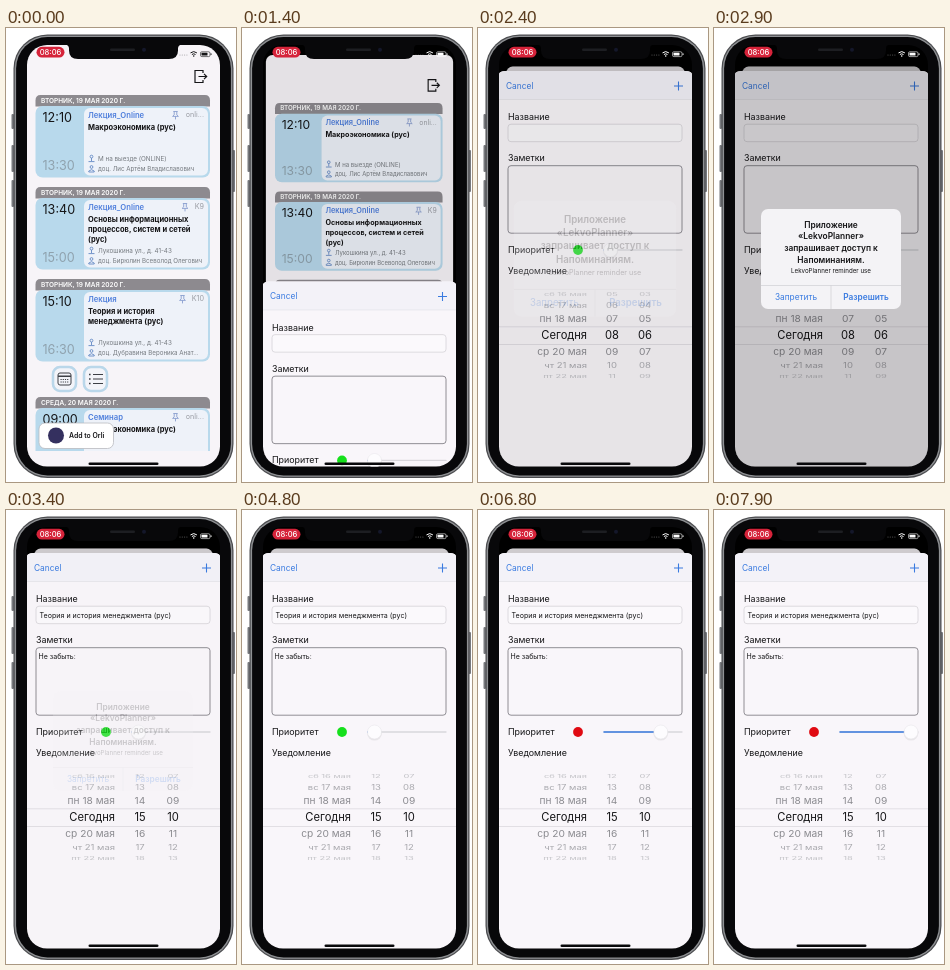
An HTML page for the animation above (8 s loop, 230 px wide and 454 px high).

```html
<!DOCTYPE html>
<html lang="ru">
<head>
<meta charset="utf-8">
<title>Timetable reminder</title>
<style>
  html, body { margin: 0; width: 230px; height: 454px; overflow: hidden; background: #fff; }
  svg { display: block; font-family: Inter, Roboto, sans-serif; }
</style>
</head>
<body>
<svg id="stage" width="230" height="454" viewBox="0 0 230 454"></svg>
<script>
const LOOP = 8000;
const BLUE = '#3a7be0', INK = '#151517', GRAY = '#74797f';
const GREEN = '#16e01c', YELLOW = '#f5c400', RED = '#e00a12';

// SVG string helpers; text y is the visual middle of the line
const rect = (x, y, w, h, r, fill, more = '') =>
  `<rect x="${x}" y="${y}" width="${w}" height="${h}" rx="${r}" fill="${fill}" ${more}/>`;
const text = (x, y, size, str, fill = INK, weight = 400, anchor = 'start') =>
  `<text x="${x}" y="${(y + size * 0.34).toFixed(2)}" font-size="${size}" fill="${fill}" font-weight="${weight}" text-anchor="${anchor}">${str}</text>`;
const line = (d, stroke, width = 1, more = '') =>
  `<path d="${d}" fill="none" stroke="${stroke}" stroke-width="${width}" ${more}/>`;
const shape = (d, fill) => `<path d="${d}" fill="${fill}"/>`;
const dot = (x, y, r, fill, more = '') =>
  `<circle cx="${x}" cy="${y}" r="${r}" fill="${fill}" ${more}/>`;
const group = (id, body) => `<g id="${id}">${body}</g>`;

function card(dy, day, from, to, kind, pinX, room, lines, place, teacher) {
  const ring = 'stroke="#6489c4" stroke-width=".9"';
  const pin = `<g transform="translate(${pinX} 0)">` +
    line('M-2.200 83.500h4.400M-1.300 83.700v3.200l-1.600 1.500h5.800l-1.600-1.500V83.700M0 88.400v3', '#8a9fd0', 0.9) + '</g>';
  const spot = dot(85.5, 128.6, 1.4, 'none', ring) + line('M85.500 130v3M82.500 133.600h6', '#6489c4', 0.9);
  const person = dot(85.5, 139, 1.4, 'none', ring) + line('M82.800 144v-1q2.700-2.600 5.400 0v1z', '#6489c4', 0.9);
  return `<g transform="translate(0 ${dy})">` +
    shape('M29.500 78.500v-6q0-5.500 5-5.500h164.500q5 0 5 5.500v6z', '#8d8a8f') +
    text(35, 72.5, 6.5, day, '#fff', 600) +
    rect(29.5, 78, 174.5, 71.5, 7, '#b8d9ec') +
    rect(78, 80, 124, 67.5, 6, '#eef2f9') +
    text(36.5, 89.5, 12.6, from) + text(36.5, 137.3, 12.6, to, '#8fa2ae') +
    text(82, 87, 7.7, kind, '#4f7fdc', 600) + pin +
    text(198, 87, 7.2, room, '#9a9da4', 400, 'end') +
    lines.map((s, i) => text(82, 99.5 + i * 10.2, 7.5, s, INK, 700)).join('') +
    spot + person +
    text(92, 131, 6.3, place, GRAY) + text(92, 141.3, 6.2, teacher, GRAY) + '</g>';
}

function list() {
  const tue = 'ВТОРНИК, 19 МАЯ 2020 Г.', street = 'Лукошкина ул., д. 41-43';
  const cards =
    card(0, tue, '12:10', '13:30', 'Лекция_Online', 169.5, 'onli...', ['Макроэкономика (рус)'],
      'М на выезде (ONLINE)', 'доц. Лис Артём Владиславович') +
    card(92, tue, '13:40', '15:00', 'Лекция_Online', 179, 'K9',
      ['Основы информационных', 'процессов, систем и сетей', '(рус)'], street, 'доц. Бирюлин Всеволод Олегович') +
    card(184, tue, '15:10', '16:30', 'Лекция', 176.5, 'K10', ['Теория и история', 'менеджмента (рус)'],
      street, 'доц. Дубравина Вероника Анат...') +
    card(302, 'СРЕДА, 20 МАЯ 2020 Г.', '09:00', '10:20', 'Семинар', 169.5, 'onli...', ['Макроэкономика (рус)'], '', '');
  const icon = '#3c3f45';
  const buttons = [47, 78].map(x => rect(x, 339, 23, 24, 7, '#f3f4f9', 'stroke="#bad7ea" stroke-width="2.6"')).join('') +
    rect(52, 345, 13, 12, 2, 'none', `stroke="${icon}" stroke-width="1"`) +
    line('M52 348.300h13', icon, 1.6) +
    line('M54.500 351.500h8M54.500 354h8', icon, 1, 'stroke-dasharray="1.2 1"') +
    line('M87 346.500h10M87 351h10M87 355.500h10', icon, 1.1) +
    line('M83 346.500h1.600M83 351h1.600M83 355.500h1.600', icon, 1.5);
  const exit = line('M197 45v-2.500h-8v12h8V52M192.500 48.500h8M198 45.800l2.700 2.700-2.700 2.700', INK, 1.2);
  const chip = rect(33, 395, 74.5, 25.5, 6, '#fff', 'stroke="#b9babf" stroke-width=".8"') +
    dot(50, 407.5, 8, '#34305f') + text(63, 408, 6.9, 'Add to Orli', INK, 600);
  return rect(20, 17, 195, 422, 7, '#f7f4f8') +
    `<g clip-path="url(#listArea)">${cards}${buttons}</g>` + exit + chip;
}

function picker(id, hour, minute) {
  const pad = n => String(n).padStart(2, '0');
  const days = ['сб 16 мая', 'вс 17 мая', 'пн 18 мая', 'Сегодня', 'ср 20 мая', 'чт 21 мая', 'пт 22 мая'];
  const look = [[11.2, 1, 0, INK], [10.2, 0.92, 16.3, '#8b8b90'], [9.5, 0.75, 30.3, '#a9a9ae'], [9.3, 0.48, 41, '#c4c4c8']];
  return group(id, days.map((day, i) => {
    const off = i - 3, [size, squash, dist, fill] = look[Math.abs(off)];
    const y = 307.5 + Math.sign(off) * dist;
    return `<g transform="translate(0 ${y}) scale(1 ${squash})">` +
      text(109, 0, size, day, fill, 400, 'end') +
      text(134, 0, size, pad(hour + off), fill, 400, 'middle') +
      text(167, 0, size, pad(minute + off), fill, 400, 'middle') + '</g>';
  }).join(''));
}

function sheet() {
  const label = (y, s) => text(30, y, 8.9, s);
  return shape('M20 460V50q0-7 7-7h181q7 0 7 7v410z', '#f9f6fa') +
    shape('M20 71.500V50q0-7 7-7h181q7 0 7 7v21.500z', '#f3f2f8') +
    line('M20 71.500h195', '#e0dfe4', 0.6) +
    text(28, 58, 8.4, 'Cancel', BLUE) + line('M196 58h9M200.500 53.500v9', BLUE, 1.1) +
    label(89.3, 'Название') + label(130.3, 'Заметки') + label(222, 'Приоритет') + label(243.2, 'Уведомление') +
    rect(30, 96.2, 174, 17.5, 3, '#fbf9fc', 'stroke="#d6d4d9" stroke-width=".8"') +
    rect(30, 137.7, 174, 67.5, 3, '#f9f6fa', 'stroke="#85838a" stroke-width=".9"') +
    group('filled', text(33.5, 105.3, 7.1, 'Теория и история менеджмента (рус)') + text(32.5, 146.5, 7, 'Не забыть:')) +
    dot(100, 222, 4.9, GREEN, 'id="level"') +
    line('M126 222h78', '#d9d7dc', 1.3, 'stroke-linecap="round"') +
    line('M126 222h6', BLUE, 1.5, 'id="track" stroke-linecap="round"') +
    group('knob', dot(0, 1.2, 7.4, '#0001') + dot(0, 0, 7, '#fdfcfe', 'stroke="#e4e2e6" stroke-width=".5"')) +
    picker('before', 8, 6) + picker('after', 15, 10) +
    line('M20 298.800h195M20 316.500h195', '#d8d6db', 0.7);
}

function alertBox() {
  const mid = (y, size, s, weight) => text(117, y, size, s, INK, weight, 'middle');
  return rect(47, 181, 140, 100, 7, '#f4f3f6') +
    ['Приложение', '«LekvoPlanner»', 'запрашивает доступ к', 'Напоминаниям.']
      .map((s, i) => mid(197 + i * 11.6, 8.4, s, 600)).join('') +
    mid(243.3, 6.2, 'LekvoPlanner reminder use', 400) +
    line('M47 257.500h140M117 257.500V281', '#c9c9ce', 0.6) +
    text(82, 269, 8.3, 'Запретить', BLUE, 400, 'middle') +
    text(152, 269, 8.3, 'Разрешить', BLUE, 600, 'middle');
}

function statusBar() {
  return rect(30.5, 18.8, 28, 10.8, 5.4, '#d6233a') + text(44.5, 24.3, 7.6, '08:06', '#fff', 500, 'middle') +
    group('icons',
      [0, 1, 2, 3].map(i => dot(174 + i * 2.3, 27, 0.6, 'currentColor', 'opacity=".35"')).join('') +
      line('M184.500 24.900q3.200-2.600 6.400 0M185.900 26.500q1.800-1.400 3.600 0', 'currentColor', 1) +
      dot(187.7, 28, 0.8, 'currentColor') +
      rect(194.5, 23.8, 9.5, 4.8, 1.3, 'none', 'stroke="currentColor" stroke-width=".6"') +
      rect(195.5, 24.8, 6, 2.8, 0.6, 'currentColor') + rect(204.6, 25.3, 0.9, 1.8, 0.4, 'currentColor'));
}

// concentric layers of the phone body: inset and colour
const body = () => [[0, '#4a4b4e'], [1.2, '#8f9194'], [2.6, '#08080a']].map(([d, fill]) =>
  rect(7.5 + d, 6.5 + d, 220 - 2 * d, 443.5 - 2 * d, 34 - d, fill)).join('');

const stage = document.getElementById('stage');
stage.innerHTML =
  `<defs>
    <clipPath id="screen">${rect(21, 17, 193, 421.5, 20, '#000')}</clipPath>
    <clipPath id="listArea">${rect(20, 17, 195, 406, 0, '#000')}</clipPath>
  </defs>` +
  [[5.5, 86, 15], [5.5, 117, 27], [5.5, 152, 27], [226.5, 122, 42]].map(([x, y, h]) => rect(x, y, 2.5, h, 1, '#77797d')).join('') +
  body() +
  `<g clip-path="url(#screen)">` +
    rect(20, 17, 195, 422, 0, '#000') +
    group('back', list() + rect(20, 17, 195, 422, 7, '#000', 'id="shade"')) +
    group('sheet', sheet()) +
    rect(20, 17, 195, 422, 0, '#000', 'id="dim"') +
    statusBar() + group('alert', alertBox()) +
    rect(82.5, 434.4, 70, 2.6, 1.3, '#08080a') +
  `</g>` +
  shape('M59 16.500q4 .5 4 4v2q0 8.500 9 8.500h91q9 0 9-8.500v-2q0-3.500 4-4z', '#08080a') +
  rect(104, 20.5, 25, 2.4, 1.2, '#1d1e22') + dot(138, 21.7, 2, '#14172a');

const el = {};
stage.querySelectorAll('[id]').forEach(n => el[n.id] = n);
const set = (id, name, value) => el[id].setAttribute(name, value);
const ramp = (t, a, b) => Math.min(1, Math.max(0, (t - a) / (b - a)));
const out = (u, n) => 1 - (1 - u) ** n;
const smooth = u => u * u * (3 - 2 * u);

function render(t) {
  // sheet slides up while the list shrinks behind it
  const rise = out(ramp(t, 1287, 1887), 3);
  const s = 1 - 0.085 * rise;
  set('back', 'transform', `translate(${117.5 * (1 - s)} ${17 * (1 - s) + 21.5 * rise}) scale(${s})`);
  set('shade', 'opacity', 0.17 * rise);
  set('sheet', 'transform', `translate(0 ${396 * (1 - rise)})`);
  set('icons', 'color', rise > 0.3 ? '#fff' : INK);

  // permission alert
  const show = ramp(t, 2330, 2680), left = 1 - ramp(t, 3120, 3470);
  set('alert', 'opacity', show * left);
  set('alert', 'transform', `translate(117 233) scale(${1.2 - 0.2 * show}) translate(-117 -233)`);
  set('dim', 'opacity', 0.2 * out(show, 2) * left * left);

  const granted = t >= 3200;
  set('filled', 'opacity', +granted);
  set('after', 'opacity', +granted);
  set('before', 'opacity', +!granted);

  // priority slider
  const level = smooth(ramp(t, 6000, 7150)), x = 132.5 + 64.5 * level;
  set('knob', 'transform', `translate(${x} 222)`);
  set('track', 'd', `M126 222H${x}`);
  set('level', 'fill', level < 1 / 3 ? GREEN : level < 2 / 3 ? YELLOW : RED);
}

const start = performance.now();
function tick() {
  render((performance.now() - start) % LOOP);
  requestAnimationFrame(tick);
}
render(0);
requestAnimationFrame(tick);
</script>
</body>
</html>
```
